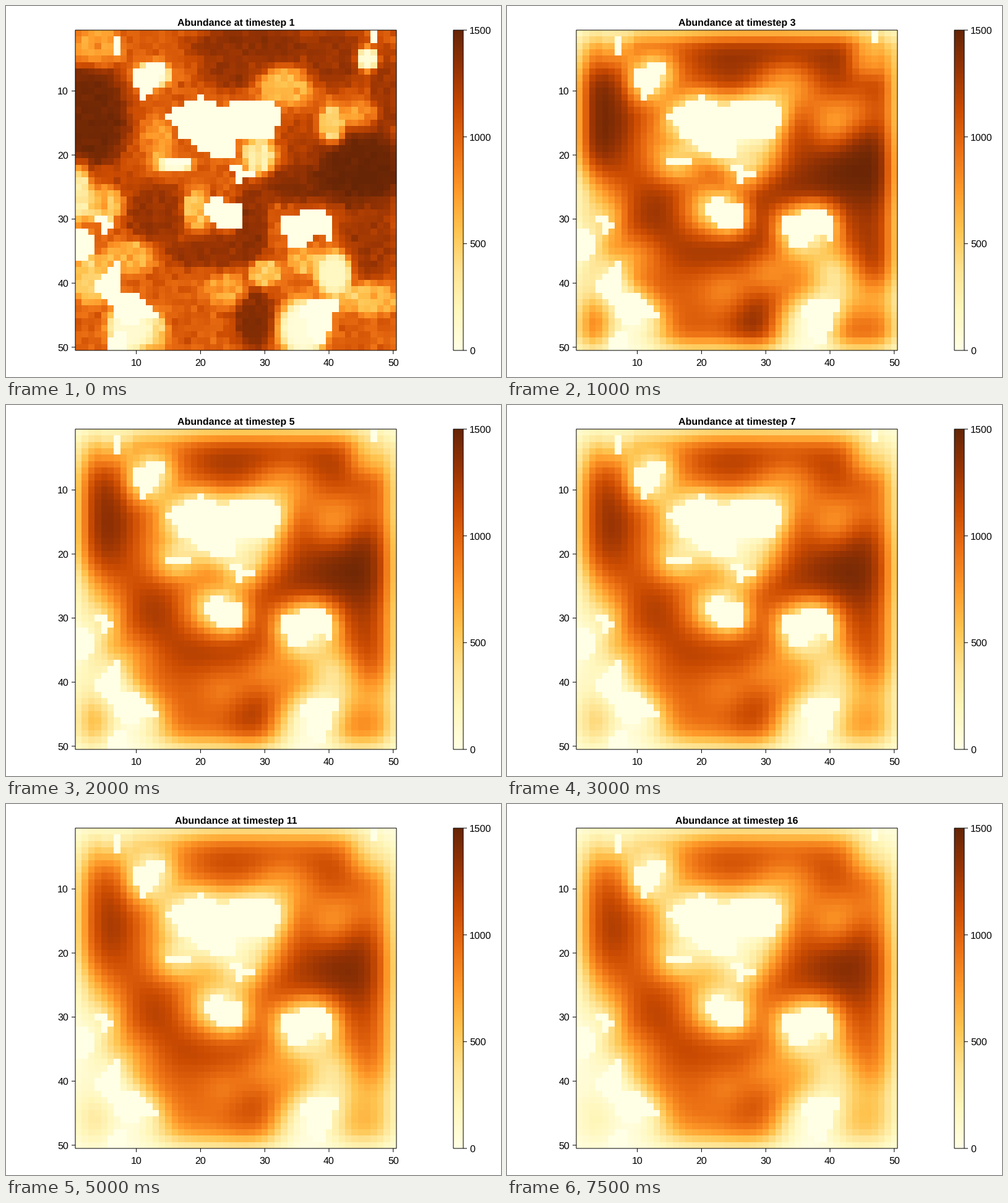
Animation, 800 px wide and 600 px high, one loop 8 s. Source, as a matplotlib script:

```python
import numpy as np
import matplotlib.pyplot as plt
from matplotlib.animation import FuncAnimation
from matplotlib.path import Path
from matplotlib.patches import Rectangle

N, MAX_VALUE, STEPS, STEP_MS = 50, 1500, 16, 500
GROWTH, REACH = 0.25, 2
LEFT, RIGHT, TOP, BOTTOM = 112, 631, 39, 557
BAR_LEFT, BAR_RIGHT = 723, 739

col, row = np.meshgrid(np.arange(1, N + 1), np.arange(1, N + 1))
cells = np.column_stack([col.ravel(), row.ravel()])
rng = np.random.default_rng(7)
land = np.full((N, N), 1030.0)
mask = np.ones((N, N))


def patch(level, x, y, rx, ry):
    """Blend a rounded area of the land towards one level."""
    d = ((col - x) / rx) ** 2 + ((row - y) / ry) ** 2
    land[:] += (level - land) / (1 + d ** 4)


def hole(*corners):
    """Close off an area where nothing can live."""
    mask[Path(corners).contains_points(cells).reshape(N, N)] = 0


def blur(field, radius):
    """Box average; nothing comes in from outside the map."""
    size = 2 * radius + 1
    padded = np.pad(field, radius)
    return sum(padded[i:i + N, j:j + N]
               for i in range(size) for j in range(size)) / size ** 2


def grow(n, capacity):
    return n * capacity / (n + (capacity - n) * np.exp(-GROWTH))


# Rich ground
patch(1350, 28, 3, 10, 3.5)
patch(1300, 25, 7, 5, 3)
patch(1300, 41, 5, 5, 5)
patch(1280, 48.5, 10, 2.5, 7)
patch(1200, 35.5, 17.5, 3, 4)
patch(1360, 35, 24.5, 6, 3)
patch(1480, 45, 22.3, 7.5, 6.6)
patch(1450, 2.5, 14, 6.5, 9)
patch(1150, 6.5, 23.5, 4, 2)
patch(1300, 13, 29, 5, 5)
patch(1320, 22, 35, 8, 2.7)
patch(1340, 28, 31, 2.5, 7)
patch(1400, 28.5, 45.5, 3.2, 5)
patch(1280, 46, 34, 4.5, 6.5)

# Poor ground
patch(720, 4, 3, 4, 3)
patch(620, 33, 9.5, 4, 3)
patch(500, 40.5, 15, 2, 3)
patch(760, 45, 13.5, 2.5, 2)
patch(750, 13.5, 18, 2.5, 4)
patch(540, 19.5, 28.5, 2, 3)
patch(600, 5, 28, 3, 3)
patch(350, 1.5, 26, 1.5, 4.5)
patch(500, 30, 38.5, 2.5, 2)
patch(700, 24, 41, 3, 2.5)
patch(650, 36, 36.5, 2.5, 2)
patch(600, 46, 42.5, 5, 2.5)
patch(480, 3, 39.5, 3, 4)
patch(620, 9, 36, 4, 2.5)
patch(550, 13, 47.5, 2, 3)
patch(320, 29, 20, 2.5, 3)

land += 75 * rng.normal(size=(N, N)) * np.clip(1.7 - land / 1000, 0.2, 1)

# Almost empty ground beside the holes
patch(60, 46, 5, 1.6, 1.8)
patch(60, 12.5, 7.5, 2.8, 2)
patch(60, 16, 21.5, 2.7, 1.1)
patch(160, 40.7, 38.5, 2.8, 3.5)
patch(60, 36, 47, 3.8, 4.5)
patch(100, 9, 47, 3.5, 4)

hole((6.5, 1.5), (7.5, 1.5), (7.5, 4.5), (6.5, 4.5))
hole((46.5, .5), (47.5, .5), (47.5, 2.5), (46.5, 2.5))
hole((9.5, 6.5), (14.5, 5.5), (13.5, 8.5), (11.5, 11.5), (10.5, 11.5))
hole((14.5, 13.5), (20, 10.5), (23, 12.6), (27, 11.4), (32.5, 12.2), (32.5, 14.5),
     (31, 17.5), (25.5, 17.5), (25.5, 20.5), (22, 20.5), (17, 17))
hole((24.5, 21.5), (28.6, 22.6), (26.2, 24.6))
hole((14.5, 20.5), (18.5, 20.5), (18.5, 21.5), (14.5, 21.5))
hole((20.3, 28), (22, 26.4), (26.5, 28), (26.5, 31.4), (22.5, 31.5))
hole((.5, 31.5), (3.5, 32.5), (3.5, 35.5), (.5, 36.5))
hole((3.5, 29.5), (5.5, 29.5), (6.5, 31.5), (4.8, 32.5))
hole((3.5, 41.5), (3.5, 39.6), (7, 36.4), (7.6, 41.5), (10, 42), (13.6, 45.5),
     (7.5, 46.5), (5.5, 43))
hole((5.5, 50.5), (6.5, 47.5), (8.5, 47.5), (8.5, 50.5))
hole((32.5, 30), (38, 28), (40.5, 30), (40.5, 34.5), (39, 32), (35.5, 34.5),
     (33.5, 34.5))
hole((35.5, 44.5), (37.5, 42.5), (41.6, 42.5), (39.5, 49.5), (37.5, 49.5))

# Growth up to the local capacity, then dispersal
capacity = np.clip(land, 15, 1490)
history = [mask * capacity]
while len(history) < STEPS:
    history.append(mask * blur(grow(history[-1], capacity), REACH))


plt.rcParams["font.family"] = "Liberation Sans"
plt.rcParams["text.hinting"] = "none"
PX = 0.72  # one pixel in points at 100 dpi
fig = plt.figure(figsize=(8, 6), dpi=100, facecolor="white")
ax = fig.add_axes([0, 0, 1, 1])

view = dict(cmap="YlOrBr", aspect="auto", interpolation="nearest")
heat = ax.imshow(history[0], vmin=0, vmax=MAX_VALUE,
                 extent=(LEFT, RIGHT, BOTTOM, TOP), **view)
ax.imshow(np.linspace(1, 0, 256)[:, None],
          extent=(BAR_LEFT, BAR_RIGHT, BOTTOM, TOP), **view)
ax.set(xlim=(0, 800), ylim=(600, 0))
ax.axis("off")


def label(x, y, text, ha, **style):
    return ax.text(x, y, text, ha=ha, va="baseline", fontsize=16 * PX, **style)


def tick(xs, ys):
    ax.plot(xs, ys, color="black", lw=PX, solid_capstyle="butt", snap=False)


for x0, x1 in ((LEFT, RIGHT), (BAR_LEFT, BAR_RIGHT)):
    ax.add_patch(Rectangle((x0, TOP), x1 - x0, BOTTOM - TOP, fill=False,
                           ec="black", lw=PX, snap=False))
for v in range(10, N + 1, 10):
    x = LEFT + (v - 0.5) / N * (RIGHT - LEFT)
    y = TOP + (v - 0.5) / N * (BOTTOM - TOP)
    tick((x, x), (BOTTOM, BOTTOM + 6))
    tick((LEFT - 6, LEFT), (y, y))
    label(x, 581.6, str(v), "center")
    label(101, y + 5.7, str(v), "right")
for v in range(0, MAX_VALUE + 1, 500):
    y = BOTTOM - v / MAX_VALUE * (BOTTOM - TOP)
    tick((BAR_RIGHT, BAR_RIGHT + 6), (y, y))
    label(749, y + 5.7, str(v), "left")
title = label((LEFT + RIGHT) / 2, 32, "", "center", weight="bold")


def draw(step):
    heat.set_data(history[step])
    title.set_text(f"Abundance at timestep {step + 1}")
    return heat, title


anim = FuncAnimation(fig, draw, frames=STEPS, interval=STEP_MS, repeat=True,
                     repeat_delay=0)
plt.show()
```
